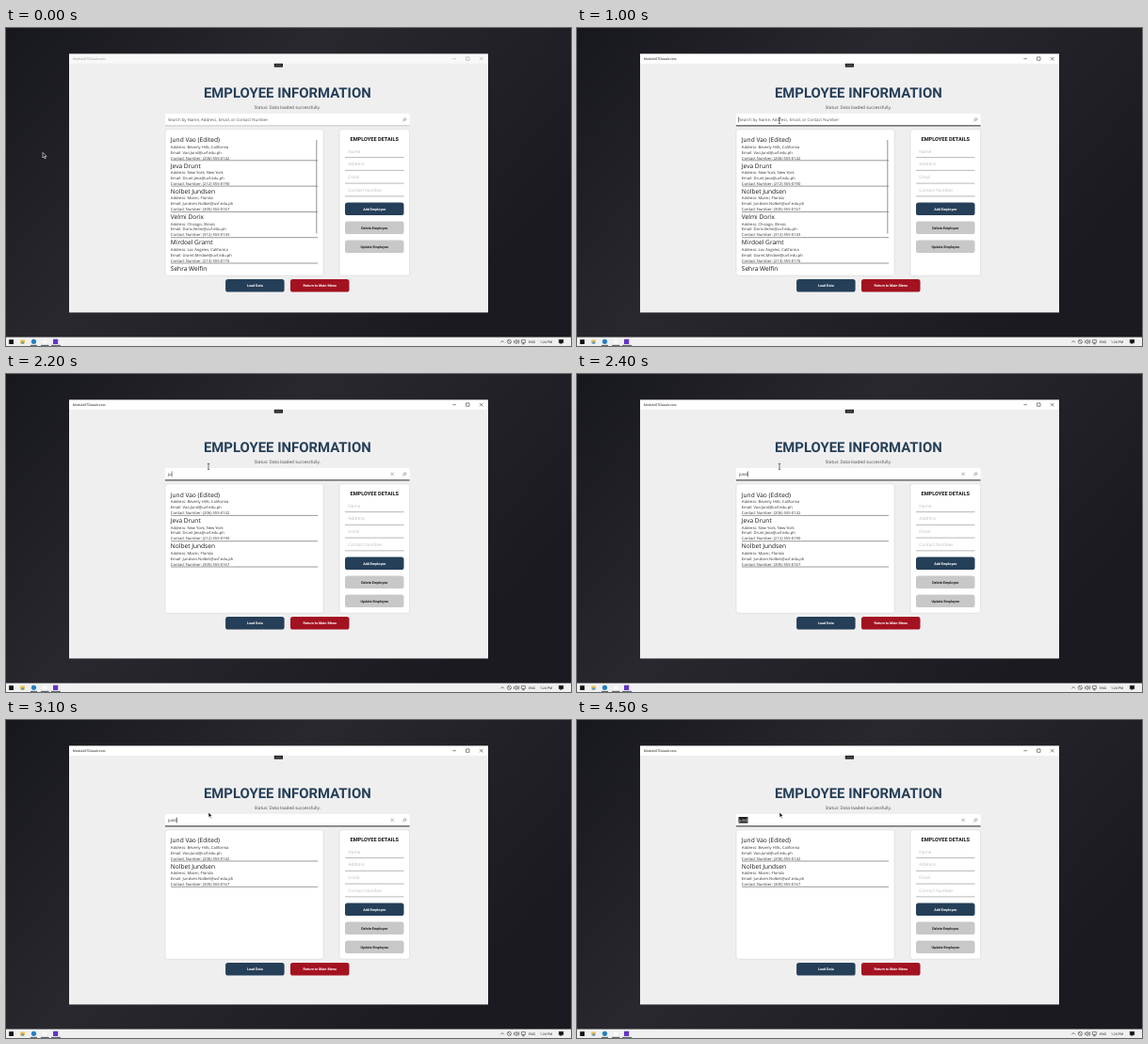
These frames come from a looping animation (600x338 px, 5 s). An HTML page:

```html
<!DOCTYPE html>
<html lang="en">
<head>
<meta charset="utf-8">
<title>Employee Information</title>
<style>
  html, body { margin: 0; width: 100%; height: 100%; overflow: hidden; background: #1b1b20; }
  svg { display: block; width: 100%; height: 100%; }
  text { font-family: "Open Sans", "Noto Sans", sans-serif; text-rendering: geometricPrecision; white-space: pre; }
  .bold { font-family: Roboto, sans-serif; font-weight: 700; }
</style>
</head>
<body>
<svg id="stage" viewBox="0 0 600 338"></svg>
<script>
const LOOP = 5000, STEP = 100;
const QUERY = 'jund';
const NAVY = '#253f58', GREY = '#c8c8c8', RED = '#a31220';
const DOMAIN = '@uvf.edu.ph';

const employees = [
  ['Jund', 'Vao', 'Beverly Hills, California', '(206) 555-0142', ' (Edited)'],
  ['Jeva', 'Drunt', 'New York, New York', '(212) 555-0190', ''],
  ['Nolbet', 'Jundsen', 'Miami, Florida', '(305) 555-0167', ''],
  ['Velmi', 'Dorix', 'Chicago, Illinois', '(312) 555-0143', ''],
  ['Mirdoel', 'Gramt', 'Los Angeles, California', '(213) 555-0176', ''],
  ['Sehra', 'Welfin', '', '', '']
];

const rect = (x, y, w, h, fill, extra = '') =>
  `<rect x="${x}" y="${y}" width="${w}" height="${h}" fill="${fill}" ${extra}/>`;
const path = (d, stroke, width = 0.5, fill = 'none') =>
  `<path d="${d}" stroke="${stroke}" stroke-width="${width}" fill="${fill}"/>`;
const label = (x, y, size, fill, str, extra = '') =>
  `<text x="${x}" y="${y}" font-size="${size}" fill="${fill}" ${extra}>${str}</text>`;
const title = (x, y, size, fill, str) =>
  label(x, y, size, fill, str, 'class="bold" text-anchor="middle"');
const shift = (dy, body) => `<g transform="translate(0 ${dy})">${body}</g>`;
const button = (x, y, fill, ink, str) =>
  rect(x, y, 62.5, 13.6, fill, 'rx="2.6"') + title(x + 31.25, y + 8.1, 3.75, ink, str);

function desktop() {
  return `<defs><linearGradient id="wall" x2="1" y2="0.5">
      <stop stop-color="#17181d"/><stop offset=".45" stop-color="#28282e"/><stop offset="1" stop-color="#1a1a20"/>
    </linearGradient><clipPath id="listClip"><rect x="169" y="108" width="168" height="150.5"/></clipPath></defs>`
    + rect(0, 0, 600, 338, 'url(#wall)');
}

function taskbar() {
  const ink = '#222';
  return rect(0, 328.6, 600, 9.4, '#f0f0f0')
    + rect(3.2, 331.2, 4.8, 4.8, '#111')
    + rect(15.2, 331.6, 4.8, 4, '#eebd4a', 'rx=".4"') + rect(16.2, 333.6, 2.8, 2, '#4b9bd2')
    + '<circle cx="29.5" cy="333.3" r="2.6" fill="#267fc0"/>'
    + rect(39, 331.2, 4.4, 4.2, '#fafafa')
    + rect(50, 330.8, 5.2, 5.2, '#6334c4', 'rx=".5"')
    + path('M26 337.4h7M37 337.4h8.5M48 337.4h10', '#3d4a55', 0.9)
    + path('M525.3 334.3l1.8-1.8 1.8 1.8', ink, 0.6)
    + path('M532.3 333.4a2.1 2.1 0 1 0 4.2 0a2.1 2.1 0 1 0-4.2 0M533 332l3 3', ink)
    + path('M539.5 332.6h1.2l1.4-1.3v4.4l-1.4-1.3h-1.2zM543.2 332q1 1.4 0 2.9M544.2 331.3q1.5 2.2 0 4.3', ink)
    + path('M547.4 331.6h4v2.8h-4zM548 335.8h2.8M549.4 334.4v1.4', ink)
    + label(555, 334.7, 3.5, '#111', 'ENG') + label(567, 334.7, 3.5, '#111', '1:24 PM')
    + path('M587.2 331.2h4.6v3.6h-1.7l-1.2 1.3v-1.3h-1.7z', '#111', 0.4, '#111');
}

function windowFrame(active) {
  const ink = active ? '#111' : '#999';
  return rect(67, 27.6, 445, 274.8, '#f0eff0')
    + rect(67, 27.6, 445, 10.2, active ? '#fff' : '#f8f8f8')
    + label(70.8, 33.9, 3.5, ink, 'Module07DataAccess')
    + path('M474.3 32.7h3.6M488.6 30.9h3.4v3.4h-3.4zM503 30.9l3.5 3.5M506.5 30.9l-3.5 3.5', ink)
    + rect(284.8, 37.8, 9.2, 3.8, '#202024') + path('M286.2 39.6h6.4', '#999', 0.5);
}

function searchBox({ focused, typed, caret, selected }) {
  const charWidths = [1.11, 2.68, 2.68, 2.68];
  const textWidth = charWidths.slice(0, typed.length).reduce((a, b) => a + b, 0);
  const x = 171.9;
  let out = rect(169, 91, 259.6, 13.2, '#fff', 'rx="1.2"')
    + path('M169 103.9h259.6', focused ? '#222' : '#999', focused ? 1 : 0.6);
  if (selected) out += rect(x - 0.4, 94, textWidth + 0.8, 6.6, '#222');
  out += label(x, 99.1, 4.375, selected ? '#fff' : typed ? '#222' : '#555',
    typed || 'Search by Name, Address, Email, or Contact Number');
  if (caret) out += rect(x + textWidth + (typed ? 0.1 : -0.5), 94.4, 0.5, 6, '#111');
  if (typed) out += path('M408.4 95.6l3.4 3.4M411.8 95.6l-3.4 3.4', '#666');
  return out + path('M422.4 97a1.3 1.3 0 1 0 2.6 0a1.3 1.3 0 1 0-2.6 0M422.8 97.9l-1.7 1.7', '#666');
}

function employeeRow([first, last, address, phone, note], i) {
  const ink = '#333';
  return shift(i * 27.3, label(174.8, 121.3, 6.6, '#181818', `${first} ${last}${note}`)
    + (phone && label(174.8, 127.7, 4.13, ink, `Address: ${address}`)
      + label(174.8, 133.6, 4.13, ink, `Email: ${last}.${first}${DOMAIN}`)
      + label(174.8, 139.5, 4.13, ink, `Contact Number: ${phone}`)
      + path('M175 140.8h156', '#555', 0.6)));
}

function detailsForm() {
  const fields = ['Name', 'Address', 'Email', 'Contact Number'];
  return title(391.2, 119.5, 5.625, '#111', 'EMPLOYEE DETAILS')
    + fields.map((name, i) => shift(i * 13.75,
        label(363.3, 132.7, 4.7, '#bdbdbd', name) + path('M360 137.6h62.5', '#888', 0.6))).join('')
    + button(360, 185.4, NAVY, '#fff', 'Add Employee')
    + button(360, 205.4, GREY, '#222', 'Delete Employee')
    + button(360, 225.4, GREY, '#222', 'Update Employee');
}

function pointer(t) {
  const p = Math.min(t / 600, 1), eased = p * p * (3 - 2 * p);
  const x = 39 + 176 * eased, y = 132.3 - 34.3 * eased;
  const beam = t >= 600 && t < 2600;
  const shape = beam
    ? path('M-1.2-2.6h2.4M0-2.6v6M-1.2 3.4h2.4', '#222', 0.6)
    : path('M0 0v5.6l1.3-1.2 1 2.2 .9-.4-1-2.1h1.9z', '#fff', 0.6, '#111');
  return `<g transform="translate(${x} ${y})">${shape}</g>`;
}

function scene(t) {
  const focused = t >= 800, filtered = t >= 2200;
  const typed = QUERY.slice(0, t < 2000 ? 0 : t < 2200 ? 1 : t < 2300 ? 2 : t < 2400 ? 3 : 4);
  const key = t < 2200 ? '' : t < 2600 ? QUERY[0] : QUERY;
  const rows = employees.filter(([a, b]) => `${a} ${b}`.toLowerCase().includes(key));
  const dy = filtered ? 9 : 0;
  const listShift = filtered ? (t < 2800 ? 9.6 : 9.2) : 0;
  const panel = (x, w) => rect(x, 107.8 + dy, w, 155.4 - 2 * dy, '#fff', 'rx="2.6" stroke="#d6d6d6" stroke-width=".6"');

  return desktop() + taskbar() + windowFrame(focused)
    + shift(dy, title(298.8, 73.8, 14.9, NAVY, 'EMPLOYEE INFORMATION')
      + label(298.8, 86.1, 4.67, '#444', 'Status: Data loaded successfully.', 'text-anchor="middle"')
      + searchBox({ focused, typed, caret: focused && t < 3900, selected: t >= 4200 }))
    + panel(169, 168.2) + panel(354, 74.6)
    + shift(listShift, `<g clip-path="url(#listClip)">${rows.map(employeeRow).join('')}</g>`)
    + (filtered ? '' : path('M329.8 119v99.5', '#777', 0.8))
    + shift(dy, detailsForm())
    + shift(-dy, button(233.1, 267, NAVY, '#fff', 'Load Data')
      + button(302, 267, RED, '#fff', 'Return to Main Menu'))
    + pointer(t);
}

const stage = document.getElementById('stage');
let shown = -1;
function tick() {
  const t = Math.floor(performance.now() % LOOP / STEP) * STEP;
  if (t !== shown) stage.innerHTML = scene(shown = t);
  requestAnimationFrame(tick);
}
tick();
</script>
</body>
</html>
```
